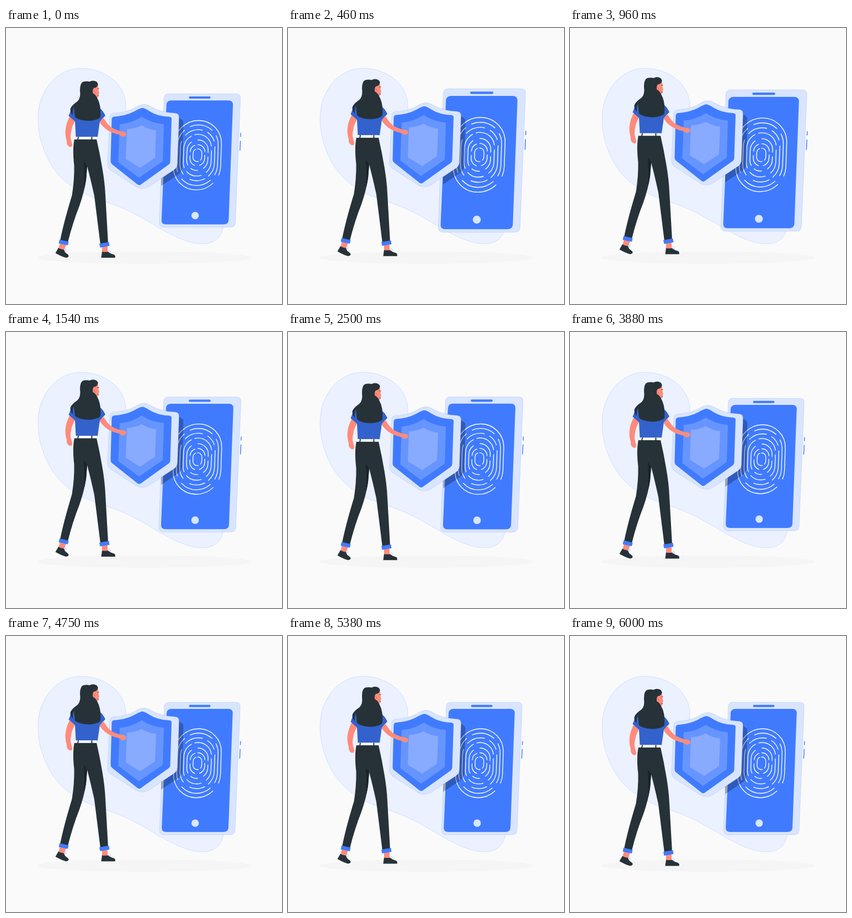
Animation of 500x500 px, one loop 6040 ms. Source, as an HTML page:

```html
<!DOCTYPE html>
<html lang="en">
<head>
<meta charset="utf-8">
<title>Shield and phone</title>
<style>
  html, body { margin: 0; height: 100%; overflow: hidden; background: #fafafa; }
  svg { display: block; width: 100%; height: 100%; }
  .blue { fill: #407bff; }
  .pale { fill: #d9e5ff; }
  .dark { fill: #263238; }
  .skin { fill: #ff8b7b; }
  .shirt { fill: #3362cc; }
  .edge { stroke: #407bff; stroke-width: .3; stroke-opacity: .6; }
  .line { fill: none; stroke: #fff; stroke-width: 1.3; stroke-linecap: round; }
</style>
</head>
<body>
<svg viewBox="0 0 500 500">
  <rect width="500" height="500" fill="#fafafa"/>
  <path class="edge" fill="#ebf1ff" d="M58 165C58 113 92 73 136 73C180 73 217 103 217 140C217 200 240 230 300 250C360 270 395 300 395 345C395 375 382 391 356 391C308 391 258 344 203 323C165 308 135 304 100 271C74 244 58 203 58 165Z"/>
  <ellipse cx="250.500" cy="416" rx="194" ry="11" fill="#f5f5f5"/>

  <g id="phone">
    <path class="pale edge" d="M295 120H416Q424.500 120 424.200 128L415 352Q414.500 360 406 360H286Q278 360 278.300 352L286.700 128Q287 120 295 120Z"/>
    <path class="blue" d="M300 132H402.500Q411 132 410.700 140L403 347Q402.500 355 394 355H290Q281.800 355 282.200 347L291 140Q291.500 132 300 132Z"/>
    <rect class="blue" x="331.500" y="124.700" width="39" height="4" rx="2"/>
    <circle class="pale" cx="342.700" cy="339" r="6.700"/>
    <path d="M424.900 190.500L424.500 197.500M424.200 204.500L423.400 222" stroke="#407bff" stroke-width="1.400"/>
    <g id="print" class="line" transform="translate(346.800 230.500) skewX(-2)"></g>
  </g>

  <g id="float">
    <path d="M312 161L319.500 166.500Q321.300 168 321.300 171L319.500 251Q319 260 312 265L281 286V270Z" opacity=".27"/>

    <path class="pale edge" d="M194 154.500Q217 153 232 145Q243 138 250 138Q256 138 264 143Q281 153 307 154Q313.500 154.500 313.500 162L310.500 246Q310 253 304 257L259 287Q247 294 235 287L189 257Q184 253 184 246L188 161Q188.500 155 194 154.500Z"/>
    <path class="blue" d="M195 160.500Q217 159 232 151Q243 144.500 247 144.500Q252 145 259 150Q275 160 296 160.500Q300 161 300 164L297.500 242Q297.500 245 295 247L244 283.500Q241 285.500 238 283L192 246.500Q189.500 244.500 189.500 241L191.500 165Q192 161 195 160.500Z"/>
    <path fill="#6695ff" d="M206 174Q226 173 246 160.500Q263 172 286 174L284 241L241 271L203.500 243Z"/>
    <path fill="#88aaff" d="M219 183Q234 182 246 176Q256 183 272 185L270 235L243 253L217 237Z"/>

    <!-- arms -->
    <path class="skin" d="M117 158Q108.500 171 107.500 187Q107.500 197 110 204Q109 212 115 215Q120 216 120 211L118 203Q116 197 118 188Q119 178 126 167Z"/>
    <path class="skin" d="M170 168L177 163Q184 175 191 180Q198 184 208 187Q215 186 218 191Q218 196 211 196.500Q207 194 205 193Q190 190 180 182Q174 177 170 171Z"/>

    <!-- ankles, shoes, cuffs -->
    <path class="skin" d="M98 389L109 392L105 403L95 400ZM174 396L184 395L184 406L174 406Z"/>
    <path class="dark" d="M95 398Q99 401 105 401L107 406L113 411Q115 415 109 416Q103 415 89.500 407.500Z"/>
    <path class="dark" d="M174 405Q179 406 185 405L190 408.500L196 410.500Q199 413 197.500 416H172.500Z"/>
    <path d="M104 402L107 398L109 402L105 403M184 405L187 402L190 405L186 407" fill="none" stroke="#a9c0ef" stroke-width=".8"/>

    <!-- trousers -->
    <path class="dark" d="M124 201H164Q170 227 174.500 254Q179 280 180 302L185 390L171 392L160 304Q153 272 147 250L145 275Q142 296 133 322Q121 352 112 388L98 385Q104 354 119.500 303Q124 275 123.500 249Q120 219 124 201Z"/>
    <path d="M141 241L147 250L145 275L142 290Q142 260 141 241Z" fill="#1a2327"/>
    <path class="blue" d="M97 383L113.500 387L112 393.500L95.500 390ZM169 390.500L186.500 387.500L187.500 394.500L170.500 397.500Z"/>

    <!-- shirt and belt -->
    <path class="shirt" d="M121 143Q116 151 113.500 159L125 169L126.500 197H166L170 169L180 158.500Q176 150 171 146Z"/>
    <path fill="#fff" d="M125 197H164.500L165 201.500H124Z"/>
    <path class="dark" d="M130 197H132L131 202.500H129ZM154.500 197H156.500V202.500H154.500Z"/>

    <!-- head -->
    <path class="skin" d="M155 109Q161 106 167 104L167.500 112L169 118L167.500 120L168 122.500Q167 126 164 126L158 124L153 118Z"/>
    <path d="M158 113Q161 114 161 118" fill="none" stroke="#e8675c" stroke-width="1"/>
    <path d="M165.500 110L168.500 109.500M166 122H168" stroke="#263238" stroke-width=".9"/>
    <path class="dark" d="M134 113Q134 99 140 97Q147 95.500 151 97Q158 93.500 164 97Q168 101 166 104Q164 108 159 108.500Q156 112 157.500 118Q162 120 165 126Q173 140 171 161Q167 167 149 168Q131 167 125 161L123 143Q120 150 121 158Q115 151 117 145Q120 139 129 133Q136 127 134 113Z"/>
  </g>
</svg>
<script>
const $ = id => document.getElementById(id);

// Each ridge: half width, half height, dash pattern in percent of its outline.
const ridges = [
  [42.5, 62.5, "35.5 5 59.500 0"],
  [36.8, 54.5, "9 4 24 4 19 5 26 4 5 0"],
  [31, 46, "3 4 8 4 22 3 11 6 24 5 10 0"],
  [25, 37.5, "17 4 20 5 14 4 30 3 3 0"],
  [19, 27.5, "22 5 15 7 9 5 29 8"],
  [13.3, 19, "19 6 21 8 20 7 14 5"],
  [7.8, 11.5, "40 7 48 5"]
];
$("print").innerHTML = ridges.map(([w, h, dash]) =>
  `<rect x="${-w}" y="${-h}" width="${2 * w}" height="${2 * h}" rx="${w}" pathLength="100" stroke-dasharray="${dash}"/>`
).join("");

const LOOP = 6040;

// Linear interpolation through [position, value] keys.
function mix(keys, p) {
  const i = keys.findIndex(k => p <= k[0]);
  if (i <= 0) return keys[0][1];
  const [a, u] = keys[i - 1], [b, v] = keys[i];
  return u + (v - u) * (p - a) / (b - a);
}

const beat = [[0, 1], [.1, 1.1], [.3, 1], [.4, 1], [.5, 1.1], [.6, 1], [1, 1]];
const rise = [[0, .5], [.5, -9.5], [1, .5]];
const start = performance.now();

function draw(now) {
  const t = Math.max(0, now - start) % LOOP;
  const p = Math.min(1, (t + 40) / LOOP);
  $("phone").setAttribute("transform",
    `translate(351 240) scale(${mix(beat, p)}) translate(-351 -240)`);
  $("float").setAttribute("transform", `translate(0 ${mix(rise, p * 2 % 1)})`);
  requestAnimationFrame(draw);
}
draw(start);
</script>
</body>
</html>
```
